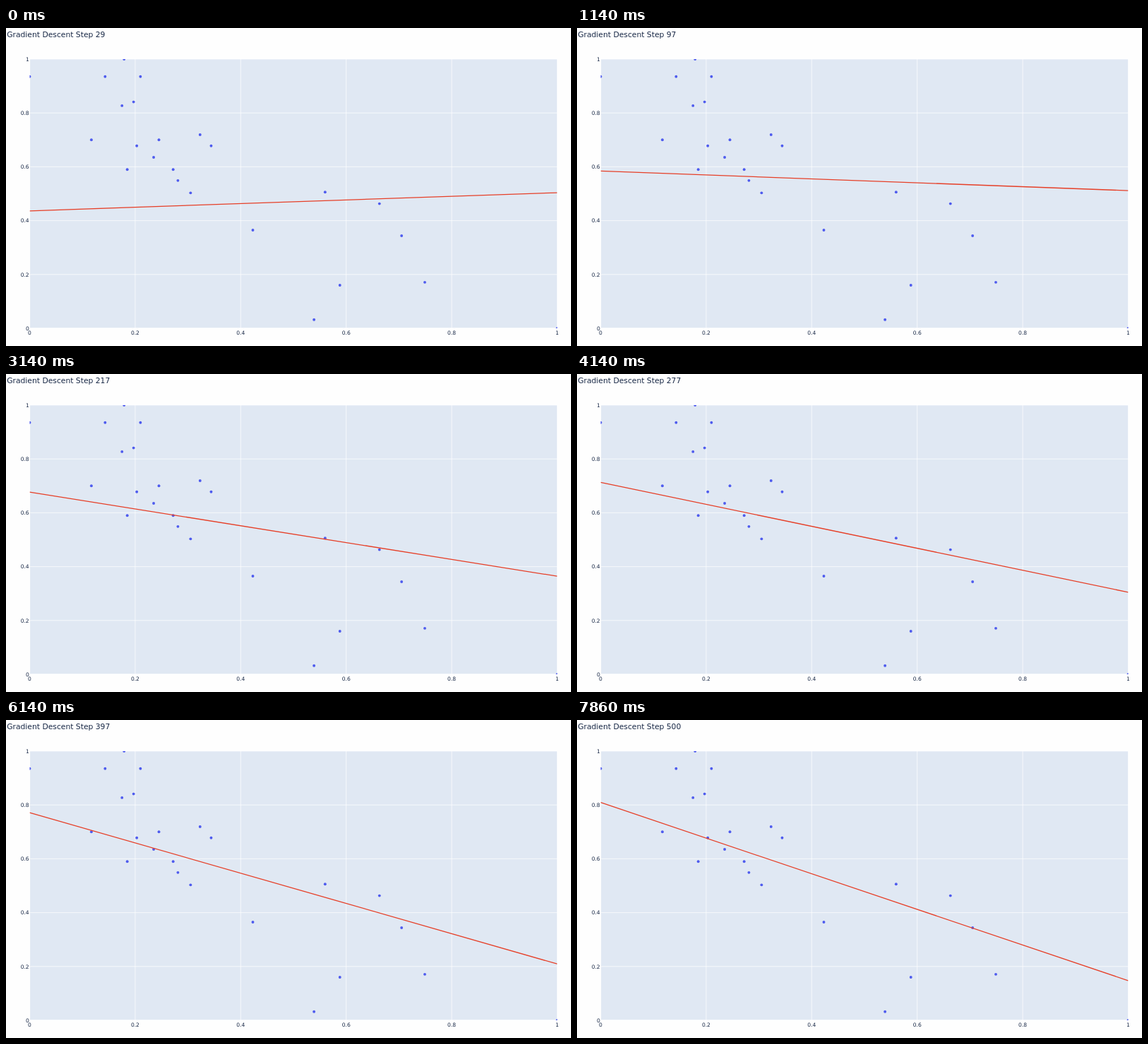
Animation, 800 px wide and 450 px high, one loop 8 s. Source, as an HTML page:

```html
<!DOCTYPE html>
<html lang="en">
<head>
<meta charset="utf-8">
<title>Gradient Descent</title>
<style>
  html, body { margin: 0; width: 100%; height: 100%; overflow: hidden; background: #fefefe; }
  svg { display: block; width: 800px; height: 450px; }
  text { font-family: Verdana, "DejaVu Sans", sans-serif; font-size: 7.55px; fill: #182846; }
  #title { font-size: 10.75px; }
  #grid line { stroke: #fff; stroke-width: .7; }
  #grid line.zero { stroke-width: 1.26; }
  #points { fill: #4e5bee; }
  #fit { stroke: #e63f27; stroke-width: 1.3; }
</style>
</head>
<body>
<svg viewBox="0 0 800 450">
  <clipPath id="plot"><rect x="33.5" y="44" width="747" height="381"/></clipPath>
  <rect x="33.5" y="44" width="747" height="381" fill="#e0e8f3"/>
  <g id="grid"></g>
  <g clip-path="url(#plot)">
    <g id="points"></g>
    <line id="fit" x1="33.5" x2="780.5"/>
  </g>
  <g id="ticks"></g>
  <text id="title" x="1.2" y="12.8"></text>
</svg>
<script>
const LOOP = 8000, FPS = 7, STEPS_PER_SECOND = 60, FIRST_STEP = 29.214;
const RATE = 0.05;
const $ = id => document.getElementById(id);
const px = x => 33.5 + 747 * x;
const py = y => 425 - 381 * y;

// Samples sharing a height: y, then each x.
const samples = [
  [1, .179], [.935, 0, .143, .21], [.841, .197], [.827, .175], [.719, .323],
  [.7, .117, .245], [.678, .203, .344], [.635, .235], [.59, .185, .272], [.549, .281],
  [.506, .56], [.503, .305], [.463, .663], [.365, .423], [.344, .705],
  [.171, .749], [.16, .588], [.032, .539], [0, 1]
].flatMap(([y, ...xs]) => xs.map(x => ({ x, y })));

function add(parent, tag, attrs, text = "") {
  const node = document.createElementNS("http://www.w3.org/2000/svg", tag);
  for (const key in attrs) node.setAttribute(key, attrs[key]);
  node.textContent = text;
  $(parent).append(node);
}

for (let i = 0; i <= 5; i++) {
  const v = i / 5, cls = i ? "" : "zero";
  add("grid", "line", { x1: px(v), x2: px(v), y1: 44, y2: 425, class: cls });
  add("grid", "line", { x1: 33.5, x2: 780.5, y1: py(v), y2: py(v), class: cls });
  add("ticks", "text", { x: px(v), y: 433.7, "text-anchor": "middle" }, v);
  add("ticks", "text", { x: 32.7, y: py(v) + 2.8, "text-anchor": "end" }, v);
}
for (const { x, y } of samples) add("points", "circle", { cx: px(x), cy: py(y), r: 1.95 });

const mean = f => samples.reduce((sum, s) => sum + f(s), 0) / samples.length;

// Least-squares gradient descent from a flat line at zero.
function fitAfter(step) {
  let a = 0, b = 0;
  for (let n = 0; n <= step; n++) {
    const error = s => a + b * s.x - s.y;
    const da = mean(error), db = mean(s => error(s) * s.x);
    a -= RATE * da;
    b -= RATE * db;
  }
  return { left: a, right: a + b };
}

let shown = -1;
function render(time) {
  const tick = Math.floor((time % LOOP + 5) * FPS / 1000) % (LOOP * FPS / 1000);
  const step = Math.floor(FIRST_STEP + tick * STEPS_PER_SECOND / FPS);
  if (step === shown) return;
  shown = step;
  const { left, right } = fitAfter(step);
  $("fit").setAttribute("y1", py(left));
  $("fit").setAttribute("y2", py(right));
  $("title").textContent = `Gradient Descent Step ${step}`;
}

const start = performance.now();
function loop() {
  render(performance.now() - start);
  requestAnimationFrame(loop);
}
loop();
</script>
</body>
</html>
```
